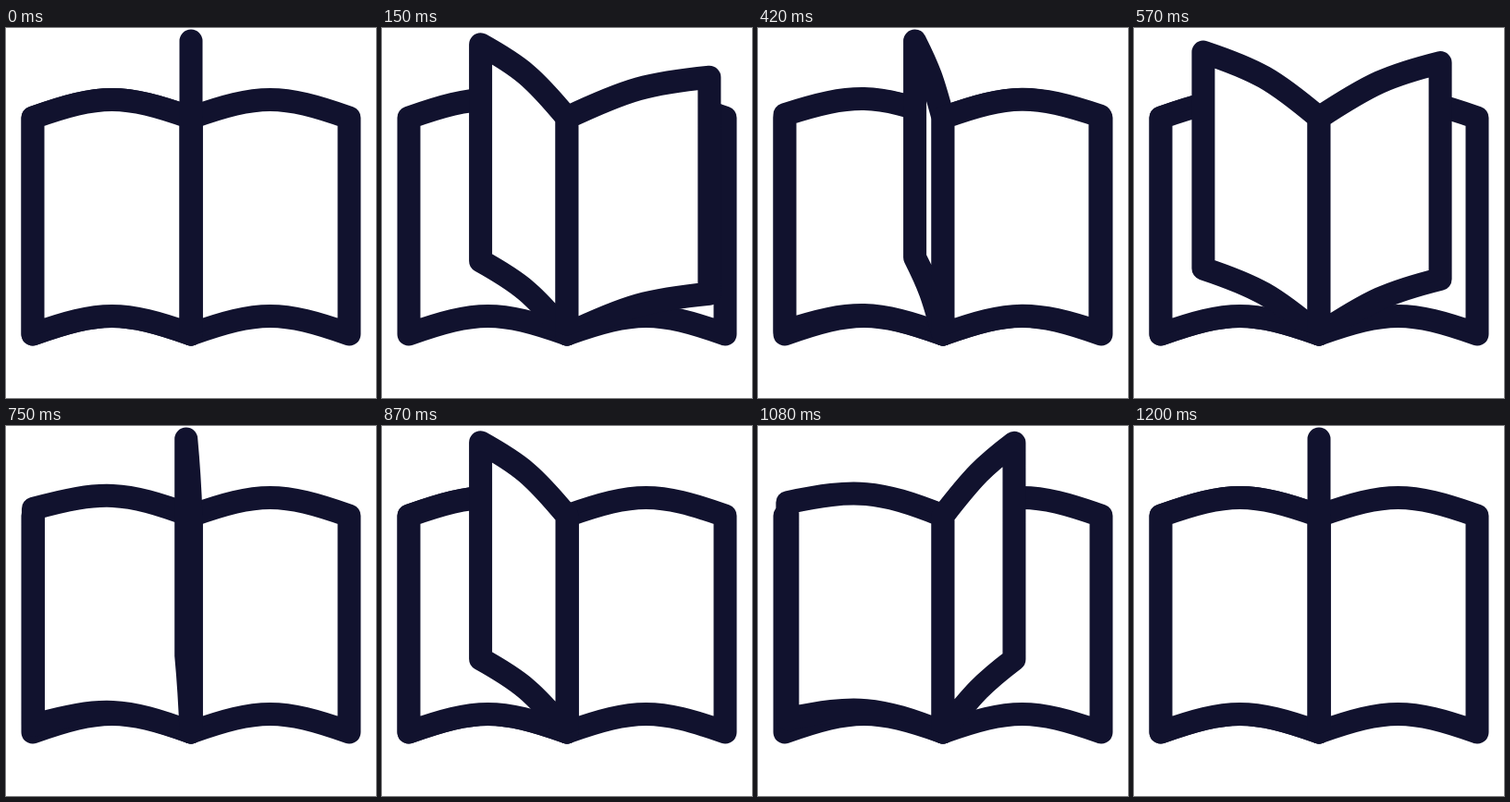
An HTML page that plays this animation: 400 px wide and 400 px high, repeating every 1230 ms.

```html
<!DOCTYPE html>
<html lang="en">
<head>
<meta charset="utf-8">
<title>Turning pages</title>
<style>
  html, body { margin: 0; width: 100%; height: 100%; overflow: hidden; background: #fff; }
  svg { display: block; width: 100vw; height: 100vh; }
  path { fill: #fff; stroke: #11122e; stroke-width: 25; stroke-linejoin: round; stroke-linecap: round; }
</style>
</head>
<body>
<svg viewBox="0 0 400 400">
  <g id="book"></g>
</svg>
<script>
const LOOP = 1230, TURN = 1200, STEP = 30, GAP = 360, PAGES = 3;
const SPINE = 200, TOP = 97, HEIGHT = 234, WIDTH = 171, PEAK = 14;
const BEGIN = -330, END = 480; // page time, zero when upright

const clamp = v => Math.min(Math.max(v, 0), 1);
const part = (t, from, to) => clamp((t - from) / (to - from));
const mix = (a, b, u) => a + (b - a) * u;
const easeIn = u => u * u;
const easeOut = u => 1 - easeIn(1 - u);
const easeInOut = u => u < 0.5 ? 4 * u ** 3 : 1 - 4 * (1 - u) ** 3;

// reach: how far the outer edge is from the spine, 0 to 1
// rest: how flat the page lies, 0 in the air, 1 on the book
function pose(t) {
  if (t < 0) {
    const lift = easeIn(part(t, BEGIN, -210));
    const swing = easeInOut(part(t, -210, -30));
    const reach = mix(1, 0.9, lift) * (1 - swing);
    return { side: 1, reach, rest: 1 - lift, rise: 55 * reach ** 3.2, lean: 0 };
  }
  const reach = easeOut(part(t, 24, 410));
  const rest = easeOut(part(t, 270, END));
  return { side: -1, reach, rest, rise: 42 * reach ** 4, lean: 5 };
}

function pagePath(t) {
  const { side, reach, rest, rise, lean } = pose(t);
  const x = SPINE + side * WIDTH * reach;
  const y = mix(PEAK + rise, TOP, rest);
  const air = Math.sqrt(reach);
  const bow = 13 * (air + rest);
  const shift = lean * air * (1 - rest);
  const handle = (u, drop) =>
    `${mix(x, SPINE, u) + shift} ${mix(y, TOP, u) - bow + drop}`;
  return `M${x} ${y}C${handle(0.43, 0)} ${handle(0.57, 0)} ${SPINE} ${TOP}v${HEIGHT}` +
    `C${handle(0.57, HEIGHT)} ${handle(0.43, HEIGHT)} ${x} ${y + HEIGHT}Z`;
}

const book = document.getElementById('book');
function addPath(d) {
  const p = document.createElementNS('http://www.w3.org/2000/svg', 'path');
  p.setAttribute('d', d);
  return book.appendChild(p);
}

addPath(pagePath(BEGIN));
addPath(pagePath(END));
const pages = Array.from({ length: PAGES }, () => addPath(''));

function draw(ms) {
  const now = Math.floor(ms % LOOP / STEP) * STEP;
  const half = TURN / 2;
  // Pages further along lie underneath; waiting pages stay hidden
  pages
    .map((_, i) => (now - i * GAP + half + TURN) % TURN - half)
    .sort((a, b) => b - a)
    .forEach((t, i) => pages[i].setAttribute('d', t > BEGIN ? pagePath(t) : ''));
}

const start = performance.now();
function tick() {
  draw(performance.now() - start);
  requestAnimationFrame(tick);
}
tick();
</script>
</body>
</html>
```
